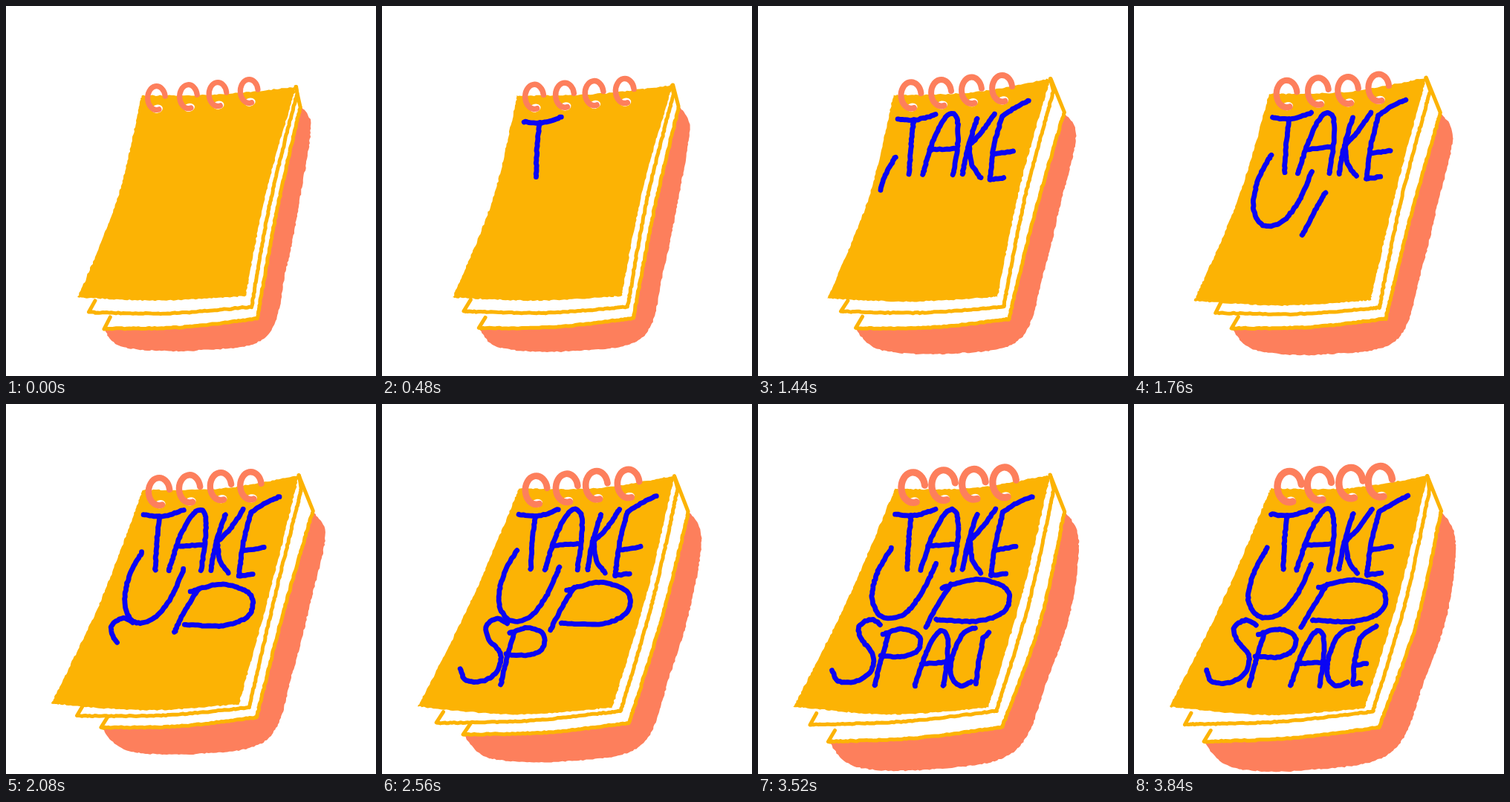
Write an HTML page with a canvas that moves like this. It is 498 px wide and 497 px high and loops after 3.92 s.

```html
<!DOCTYPE html>
<html lang="en">
<head>
<meta charset="utf-8">
<title>Notepad</title>
<style>
html, body { margin: 0; width: 100%; height: 100%; overflow: hidden; background: #fff; }
canvas { display: block; width: 498px; height: 497px; }
</style>
</head>
<body>
<canvas id="stage" width="498" height="497"></canvas>
<script>
const ctx = document.getElementById('stage').getContext('2d');
const STEP = 80, LOOP = 3920;
const YELLOW = '#fcb304', CORAL = '#fd7f5c', BLUE = '#0a05f4';
let frame = 0;

const clamp = v => Math.max(0, Math.min(1, v));
const lerp = (a, b, u) => a + (b - a) * u;
const pairs = flat => flat.flatMap((v, i) => i % 2 ? [] : [[v, flat[i + 1]]]);

function ease(time, start, end) {
  const u = clamp((time - start) / (end - start));
  return u * u * (3 - 2 * u);
}

function noise(seed) {
  const v = Math.sin(seed * 12.9898 + frame * 78.233) * 43758.5453;
  return (v - Math.floor(v)) * 2 - 1;
}

// A point moving from a to b, redrawn a little differently each frame
const move = (a, b, u) => a.map((v, j) => lerp(v, b[j], u) + noise(v + j) * 0.8);
const shift = ([x, y], dx, dy) => [x + dx, y + dy];
const between = (a, b) => a.map((v, j) => (v + b[j]) / 2);

// Catmull-Rom spline sampled about every three pixels
function curve(pts) {
  const out = [pts[0]];
  for (let i = 0; i < pts.length - 1; i++) {
    const b = pts[i], c = pts[i + 1], a = pts[i - 1] || b, d = pts[i + 2] || c;
    const n = Math.ceil(Math.hypot(c[0] - b[0], c[1] - b[1]) / 3) || 1;
    for (let k = 1; k <= n; k++) {
      const u = k / n;
      out.push([0, 1].map(j => b[j] + 0.5 * u * (c[j] - a[j] +
        u * (2 * a[j] - 5 * b[j] + 4 * c[j] - d[j] +
        u * (3 * (b[j] - c[j]) + d[j] - a[j])))));
    }
  }
  return out;
}

// Middle of an edge pushed sideways; positive is outward on a counter-clockwise outline
function bulge(a, b, bow) {
  const dx = b[0] - a[0], dy = b[1] - a[1], len = Math.hypot(dx, dy);
  return shift(between(a, b), -dy / len * bow, dx / len * bow);
}
const edge = (a, b, bow) => curve([a, bulge(a, b, bow), b]);

function trace(pts, rough) {
  ctx.beginPath();
  pts.forEach(([x, y], i) =>
    ctx.lineTo(x + noise(i + x) * rough, y + noise(i + y + 50) * rough));
}

function fill(pts, color) {
  trace(pts, 0.75);
  ctx.fillStyle = color;
  ctx.fill();
}

function line(pts, color, width) {
  trace(pts, 0.6);
  ctx.strokeStyle = color;
  ctx.lineWidth = width;
  ctx.stroke();
}

function drawPage({ left, right, top, bottomBow, sideBow }, corner) {
  const outline = [
    shift(left, 9, -15), ...edge(left, right, bottomBow), ...edge(right, top, sideBow), corner
  ];
  fill(outline, '#fff');
  line(outline, YELLOW, 5);
}

function drawBack({ left, right, top, bottomBow, sideBow }, depth) {
  const side = bulge(right, top, sideBow);
  const bottom = bulge(left, right, bottomBow);
  fill(curve([
    top,
    shift(top, depth / 2, depth),
    shift(side, depth + 3, -15),
    shift(between(side, right), depth - 2, 5),
    shift(right, depth * 0.45, depth * 0.85),
    shift(bottom, 25, depth * 1.1),
    shift(left, depth, depth * 0.9),
    left
  ]), CORAL);
}

function drawRings(progress) {
  const w = lerp(31, 42, progress), h = lerp(39, 51, progress);
  const width = 1 + w * 0.2, rx = (w - width) / 2, ry = (h - width) / 2;
  for (let i = 0; i < 4; i++) {
    const x = 188 + i * 41.2 + w / 2 + noise(i);
    const y = lerp(104, 86, progress) - i * 2.8 + h / 2 + noise(i + 9);
    ctx.beginPath();
    ctx.ellipse(x + 1, y + ry * 0.92, 7.5, 5.5, -0.2, 0, Math.PI * 2);
    ctx.fillStyle = '#fff';
    ctx.fill();
    ctx.beginPath();
    ctx.ellipse(x, y, rx, ry, 0, -0.15, -5, true);
    ctx.strokeStyle = CORAL;
    ctx.lineWidth = width;
    ctx.stroke();
  }
}

// The sheets start to slide one after another, the cover first
function drawNotepad(time) {
  const slide = layer => ease(time, 1300 + layer * 300, 2500 + layer * 300);
  const hinge = ease(time, 0, 1800), progress = time / LOOP;
  const c = slide(0), f = slide(1), r = slide(2);

  const topLeft = move([182, 120], [184, 114], c);
  const topRight = move([391, 108], [394, 96], hinge);
  const left = move([96, 392], [48, 406], c);
  const right = move([322, 390], [310, 408], c);
  const front = {
    left: move([111, 411], [69, 431], f), right: move([330, 404], [321, 413], f),
    top: move([392, 118], [398, 114], hinge), bottomBow: 5, sideBow: lerp(-5, 6, f)
  };
  const rear = {
    left: move([131, 433], [94, 453], r), right: move([338, 420], [329, 434], r),
    top: move([396, 134], [413, 144], hinge), bottomBow: 5, sideBow: lerp(-3, 10, r)
  };

  drawBack(rear, lerp(28, 39, progress));
  drawPage(rear, topRight);
  drawPage(front, topRight);
  fill([
    ...edge(topLeft, left, lerp(-11, -5, c)),
    ...edge(left, right, lerp(5, 10, c)),
    ...edge(right, topRight, lerp(-6, 5, c)),
    ...edge(topRight, topLeft, lerp(-4, -8, hinge))
  ], YELLOW);
  drawRings(progress);
}

// Pen strokes of each letter in a unit box
const bowl = d => [0.2, 0.18 * d, 0.6, 0, 0.94, 0.17 * d, 1, 0.5 * d,
  0.9, 0.8 * d, 0.6, 0.97 * d, 0.13, 0.94 * d];
const slant = [0.3, 0.1, 0.12, 0.6, 0, 1];
const glyphs = {
  T: [[0, 0.08, 0.5, 0.1, 1, 0], [0.42, 0.1, 0.35, 0.5, 0.31, 1]],
  A: [[0, 1, 0.33, 0.4, 0.7, 0.03, 0.95, 0.08, 0.97, 0.5, 0.85, 1], [0.2, 0.6, 0.94, 0.57]],
  K: [[0.45, 0.08, 0.2, 0.5, 0.02, 0.95], [1, 0, 0.6, 0.3, 0.2, 0.52], [0.22, 0.52, 0.3, 0.8, 0.56, 1]],
  E: [[0.3, 0.2, 0.1, 0.6, 0, 1], [0.3, 0.2, 0.62, 0.09, 1, 0], [0.1, 0.68, 0.6, 0.64], [0, 1, 0.35, 0.98]],
  U: [[0.3, 0, 0.08, 0.36, 0, 0.75, 0.17, 1, 0.49, 0.96, 0.78, 0.66, 1, 0.24]],
  P: [slant, bowl(0.5)],
  D: [slant, bowl(0.9)],
  S: [[1, 0.08, 0.8, 0, 0.55, 0.12, 0.6, 0.32, 0.84, 0.55, 0.8, 0.82, 0.5, 0.98, 0.12, 0.98, 0, 0.8]],
  C: [[1, 0, 0.45, 0.12, 0, 0.54, 0, 0.85, 0.36, 1, 0.82, 0.93]]
};

// Each letter: glyph, writing time, box. A word starts lower and narrower, then settles.
const words = [
  { sag: 8, letters: [
    ['T', 240, 480, 184, 142, 54, 80], ['A', 480, 780, 219, 141, 51, 82],
    ['K', 780, 1040, 275, 141, 45, 86], ['E', 1040, 1400, 314, 124, 55, 106]] },
  { sag: 10, letters: [
    ['U', 1360, 1680, 154, 193, 85, 93], ['D', 1680, 2000, 226, 236, 112, 64]] },
  { sag: -3, letters: [
    ['S', 1960, 2280, 97, 290, 67, 85], ['P', 2280, 2560, 155, 303, 63, 76],
    ['A', 2640, 2900, 211, 305, 46, 74], ['C', 2900, 3200, 261, 301, 33, 78],
    ['E', 3280, 3680, 295, 299, 32, 77]] }
];

function drawWord({ sag, letters }, time) {
  const begin = letters[0][1];
  const fresh = 1 - clamp((time - begin) / 2000);
  const middle = letters.reduce((sum, l) => sum + l[3] + l[5] / 2, 0) / letters.length;
  for (const [name, start, end, x, y, w, h] of letters) {
    if (time <= start) continue;
    const place = ([u, v]) => [
      lerp(x + u * w, middle, fresh * 0.1) + noise(u + x) * 0.6,
      y + v * h + sag * fresh + noise(v + y) * 0.6
    ];
    const paths = glyphs[name].map(s => curve(pairs(s).map(place)));
    const total = paths.reduce((sum, p) => sum + p.length, 0);
    let ink = Math.ceil(total * clamp((time - start) / (end - start)));
    for (const path of paths) {
      if (ink > 1) line(path.slice(0, ink), BLUE, 6.8);
      ink -= path.length;
    }
  }
}

function draw(time) {
  ctx.fillStyle = '#fff';
  ctx.fillRect(0, 0, 498, 497);
  drawNotepad(time);
  words.forEach(word => drawWord(word, time));
}

function tick() {
  frame = Math.floor(performance.now() % LOOP / STEP);
  draw(frame * STEP);
  requestAnimationFrame(tick);
}

ctx.lineCap = ctx.lineJoin = 'round';
tick();
</script>
</body>
</html>
```
